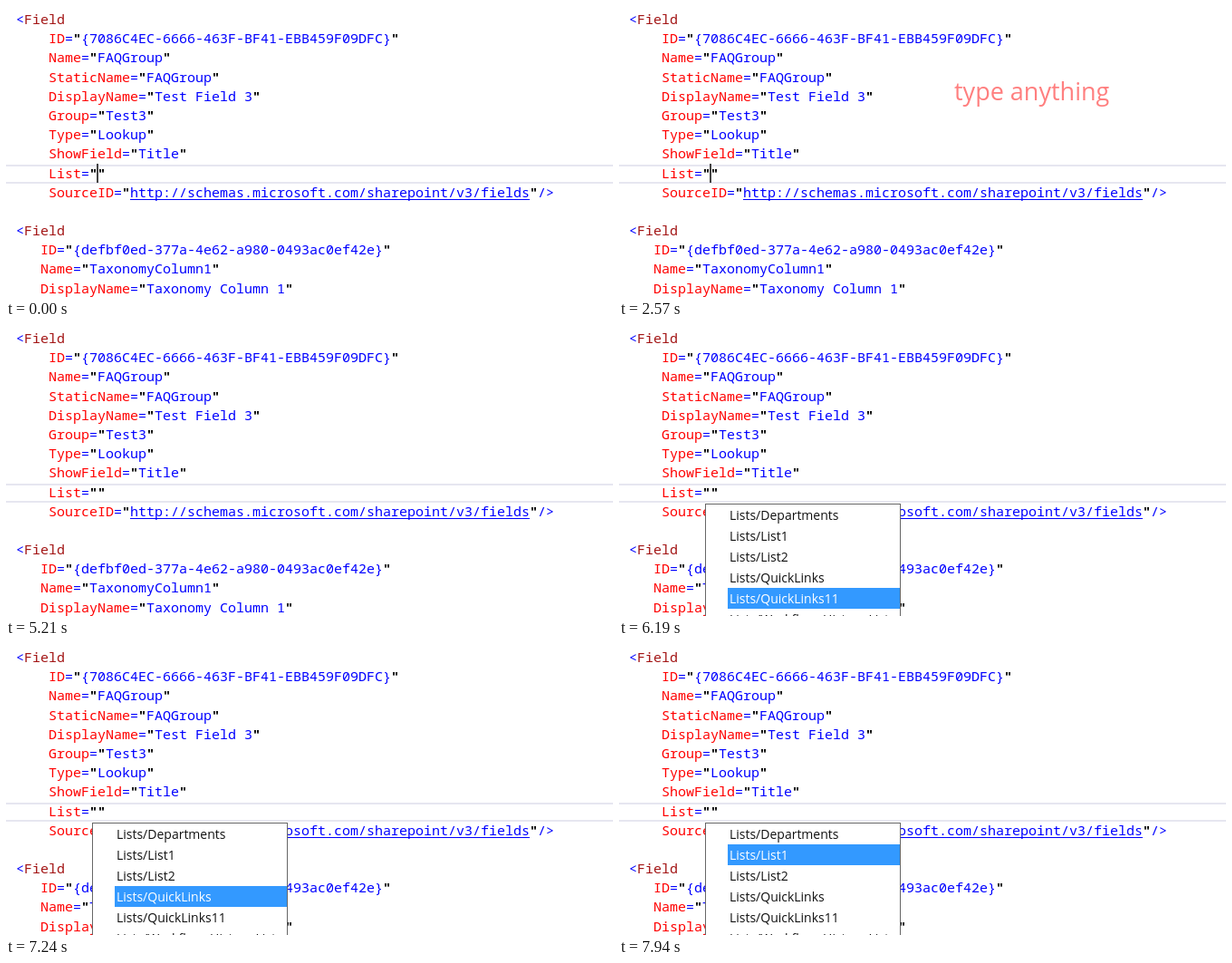
Recreate the animation shown at these times as an HTML page with a canvas. Size 670x321 px, loop 8 s.

```html
<!DOCTYPE html>
<html lang="en">
<head>
<meta charset="utf-8">
<title>Field list completion</title>
<style>
html, body { margin: 0; width: 100%; height: 100%; overflow: hidden; background: #fff; }
canvas { display: block; }
</style>
</head>
<body>
<canvas id="stage" width="670" height="321"></canvas>
<script>
const ctx = document.getElementById('stage').getContext('2d');
const W = 670, H = 321, LOOP = 8000;

const CODE_FONT = '15px "Noto Sans Mono", monospace';
const QUOTE_FONT = 'bold ' + CODE_FONT;
const LIST_FONT = '14px "Open Sans", sans-serif';
const CAPTION_FONT = '27px "Open Sans", sans-serif';
const LEFT = 11, CHAR = 9, FIRST_LINE = 19.9, LINE_STEP = 21.2;
const BLUE = '#0000ff', RED = '#ff0000', BROWN = '#a31515', BLACK = '#000';

const code = [
  '<Field',
  '    ID="{7086C4EC-6666-463F-BF41-EBB459F09DFC}"',
  '    Name="FAQGroup"',
  '    StaticName="FAQGroup"',
  '    DisplayName="Test Field 3"',
  '    Group="Test3"',
  '    Type="Lookup"',
  '    ShowField="Title"',
  '    List=""',
  '    SourceID="http://schemas.microsoft.com/sharepoint/v3/fields"/>',
  '',
  '<Field',
  '   ID="{defbf0ed-377a-4e62-a980-0493ac0ef42e}"',
  '   Name="TaxonomyColumn1"',
  '   DisplayName="Taxonomy Column 1"'
];

const items = ['Departments', 'List1', 'List2', 'QuickLinks', 'QuickLinks11', 'Workflow  History List'];

// Each track holds [start time, value] pairs; values switch without easing.
const caretTrack = [[0, true], [2640, false], [5560, true], [6050, false],
  [6470, true], [6960, false], [7450, true], [7940, false]];
const captionTrack = [[0, null], [70, ['type anything', 370, 104, 1]],
  [2570, ['type anything', 370, 104, 0.5]], [2640, null],
  [2710, ['or press Ctrl+Space', 336.5, 95, 1]], [5210, null]];
const popupTrack = [[0, false], [6120, true]];
const selectTrack = [[0, -1], [6190, 4], [7240, 3], [7380, 2], [7590, 1]];

function valueAt(track, t) {
  let value;
  for (const [start, v] of track) if (t >= start) value = v;
  return value;
}

function box(color, x, y, w, h) {
  ctx.fillStyle = color;
  ctx.fillRect(x, y, w, h);
}

function text(str, x, y, font, color) {
  ctx.font = font;
  ctx.fillStyle = color;
  ctx.fillText(str, x, y);
}

function tokenColor(token, quoted) {
  if (token === '"') return BLACK;
  if (quoted || /[<>=\/]/.test(token)) return BLUE;
  return token === 'Field' ? BROWN : RED;
}

function drawLine(line, row) {
  const y = Math.round(FIRST_LINE + row * LINE_STEP);
  let col = 0;
  for (const token of line.match(/"[^"]*"|\s+|[<=]|\/>|\w+/g) || []) {
    const parts = token[0] === '"' ? ['"', token.slice(1, -1), '"'] : [token];
    parts.forEach((part, i) => {
      const x = LEFT + col * CHAR;
      const font = part === '"' ? QUOTE_FONT : CODE_FONT;
      text(part, x, y, font, tokenColor(part, i === 1));
      if (part.startsWith('http:')) box(BLUE, x, y + 2, part.length * CHAR, 1);
      col += part.length;
    });
  }
}

function drawPopup(selected) {
  box('#666', 95, 197, 216, H);
  box('#fff', 96, 198, 214, H);
  items.forEach((name, i) => {
    const top = 198 + i * 23;
    if (i === selected) box('#3399ff', 120, top, 190, 23);
    text('Lists/' + name, 122, top + 17, LIST_FONT, i === selected ? '#fff' : '#111');
  });
}

function draw(t) {
  box('#fff', 0, 0, W, H);
  box('#e6e6f0', 0, 175, W, 2);
  box('#e6e6f0', 0, 194, W, 2);
  code.forEach(drawLine);
  if (valueAt(caretTrack, t)) box('#444', 100, 174, 2, 21);

  const caption = valueAt(captionTrack, t);
  if (caption) {
    const [str, x, y, alpha] = caption;
    ctx.globalAlpha = alpha;
    text(str, x, y, CAPTION_FONT, RED);
    ctx.globalAlpha = 1;
  }
  if (valueAt(popupTrack, t)) drawPopup(valueAt(selectTrack, t));
}

const begin = performance.now();
function tick() {
  draw((performance.now() - begin) % LOOP);
  requestAnimationFrame(tick);
}
tick();
</script>
</body>
</html>
```
